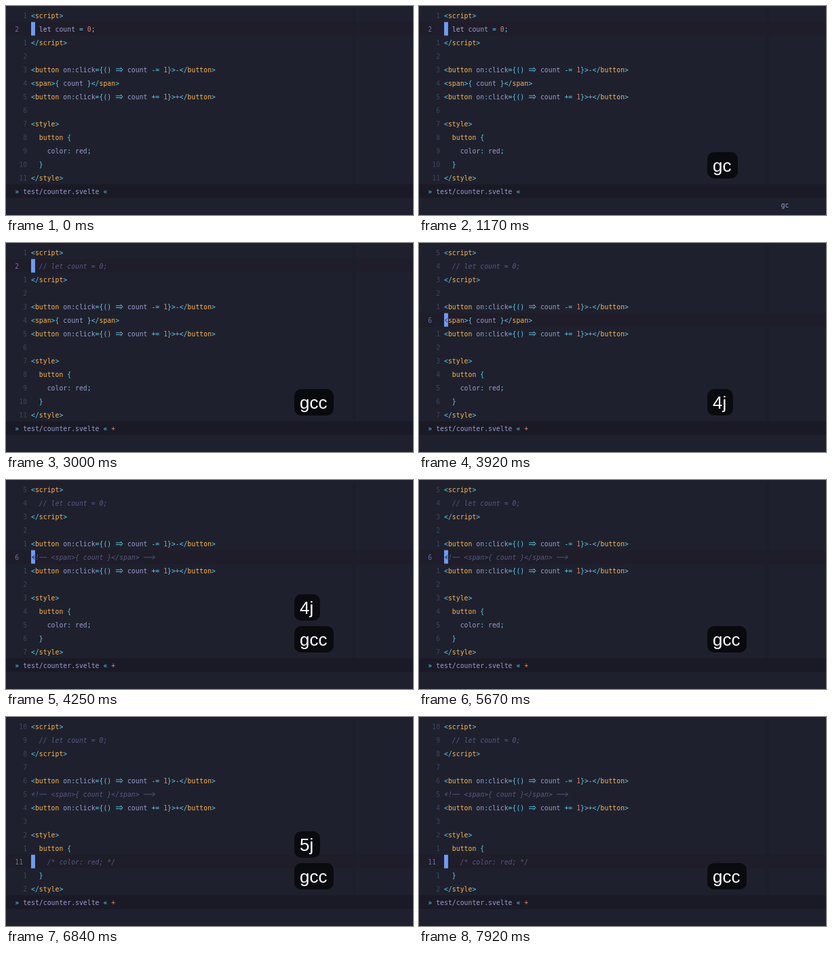
Animation of 600 by 309 pixels, one loop 8 s. Source, as an HTML page with a canvas:

```html
<!DOCTYPE html>
<html lang="en">
<head>
<meta charset="utf-8">
<style>
  html, body { margin: 0; width: 100%; height: 100%; overflow: hidden; background: #1e212d; }
  canvas { display: block; }
</style>
</head>
<body>
<canvas width="600" height="309"></canvas>
<script>
const ctx = document.querySelector('canvas').getContext('2d');
const LOOP = 8000, CELL = 5.913, ROW = 20, LEFT = 37, TOP = 3.7;
const HOLD = 1500, FADE = 170;
const MONO = '9.7px "DejaVu Sans Mono", monospace';
const COLOR = {
  back: '#1e212d', band: '#1e1d29', column: '#1c1e2a', status: '#191a26',
  text: '#9c9cce', keyword: '#b7a5de', tag: '#ffb74d', mark: '#5ccbea',
  number: '#e5806a', comment: '#565a83', gutter: '#3e4360', current: '#6a70a4',
  cursor: '#6c9cf8', plus: '#f08c4a'
};

const code = [
  '<script>', '  let count = 0;', '<\/script>', '',
  '<button on:click={() => count -= 1}>-</button>',
  '<span>{ count }</span>',
  '<button on:click={() => count += 1}>+</button>', '',
  '<style>', '  button {', '    color: red;', '  }', '</style>'
];
const comments = [
  { row: 1, at: 1500, text: '  // let count = 0;' },
  { row: 5, at: 4170, text: '<!-- <span>{ count }</span> -->' },
  { row: 10, at: 6750, text: '    /* color: red; */' }
];
const cursorRows = [[0, 1], [3340, 5], [5840, 10]];
const labels = [
  { from: 1170, done: 1500, keys: 'gcc' },
  { from: 3340, done: 3340, keys: '4j' },
  { from: 4000, done: 4170, keys: 'gcc' },
  { from: 5840, done: 5840, keys: '5j' },
  { from: 6590, done: 6750, keys: 'gcc' }
];
const labelWidth = { gc: 45, gcc: 58, '4j': 38, '5j': 38 };
const pending = [[1170, 1500, 'gc'], [4000, 4170, 'gc'], [5750, 5840, '5'], [6590, 6750, 'gc']];
const tokens = /=>|(?<=>)[+-](?=<)|\d+|\w+|[^\s\w]|\s+/g;

function rect(color, x, y, w, h) {
  ctx.fillStyle = color;
  ctx.fillRect(x, y, w, h);
}

function write(text, col, row, color, style = '') {
  ctx.font = style + MONO;
  ctx.fillStyle = color;
  [...text].forEach((ch, i) => ctx.fillText(ch, LEFT + (col + i) * CELL, TOP + row * ROW + 14));
}

function lines(color, ...paths) {
  ctx.strokeStyle = color;
  ctx.lineWidth = 0.9;
  ctx.beginPath();
  for (const path of paths)
    path.forEach(([x, y], i) => i ? ctx.lineTo(x, y) : ctx.moveTo(x, y));
  ctx.stroke();
}

function doubleArrow(col, row) {
  const x = LEFT + col * CELL + 0.8, y = TOP + row * ROW + 10.5;
  lines(COLOR.mark, [[x, y - 1.4], [x + 8.8, y - 1.4]], [[x, y + 1.4], [x + 8.8, y + 1.4]],
    [[x + 6.8, y - 3.4], [x + 10.2, y], [x + 6.8, y + 3.4]]);
}

function tokenColor(token, index, line) {
  if (token === 'let') return COLOR.keyword;
  if (/^\d/.test(token)) return COLOR.number;
  if (/^(script|button|span|style)$/.test(token)) return COLOR.tag;
  const literal = /[+-]/.test(token) && line[index - 1] === '>';
  return /\w/.test(token) || literal ? COLOR.text : COLOR.mark;
}

function codeLine(line, row) {
  for (const { 0: token, index } of line.matchAll(tokens)) {
    if (token === '=>') doubleArrow(index, row);
    else write(token, index, row, tokenColor(token, index, line));
  }
}

// Markup comment delimiters are drawn as joined arrows.
function commentLine(text, row) {
  const y = TOP + row * ROW + 10.5;
  if (text.startsWith('<!--')) {
    const end = LEFT + text.length * CELL - 0.8;
    lines(COLOR.comment, [[42, y - 3], [38.4, y], [41.2, y + 3]], [[38.4, y], [42.4, y]],
      [[49.5, y], [60, y]], [[end - 16.5, y], [end, y]],
      [[end - 3, y - 3], [end, y], [end - 3.8, y + 3]]);
    text = text.replace('<!--', ' !  ').replace('-->', '');
  }
  write(text, 0, row, COLOR.comment, 'italic ');
}

function drawCursor(row, commented) {
  const y = TOP + row * ROW, mid = y + 10.5;
  rect(COLOR.cursor, LEFT, y, CELL, ROW);
  if (code[row][0] !== '<') return;
  lines(COLOR.back, [[42, mid - 3], [38.6, mid], [42, mid + 3]]);
  if (commented) lines(COLOR.back, [[38.6, mid], [42.4, mid]]);
}

function drawLabels(t) {
  const shown = labels.filter(l => t >= l.from && t < l.done + HOLD + FADE);
  shown.forEach((label, i) => {
    const text = t < label.done ? label.keys.slice(0, -1) : label.keys;
    const y = 216 - 47 * (shown.length - 1 - i);
    ctx.globalAlpha = Math.min(1, 1 - (t - label.done - HOLD) / FADE);
    ctx.fillStyle = '#0a0b0f';
    ctx.beginPath();
    ctx.roundRect(425, y, labelWidth[text], 39, 10);
    ctx.fill();
    ctx.font = '26px "Liberation Sans", Arial, sans-serif';
    ctx.fillStyle = '#fff';
    ctx.fillText(text, 433, y + 29);
    ctx.globalAlpha = 1;
  });
}

function draw(t) {
  const current = cursorRows.findLast(([at]) => t >= at)[1];
  rect(COLOR.back, 0, 0, 600, 309);
  rect(COLOR.band, 0, TOP + current * ROW, 600, ROW);
  rect(COLOR.column, 511, 4, 5, 260);
  rect(COLOR.status, 0, TOP + 13 * ROW, 600, ROW);

  code.forEach((line, row) => {
    const note = comments.find(c => c.row === row && t >= c.at);
    if (note) commentLine(note.text, row);
    else codeLine(line, row);
    if (row === current) drawCursor(row, note);
    const number = String(row === current ? row + 1 : Math.abs(row - current));
    if (row === current) write(number, -4, row, COLOR.current);
    else write(number, -1 - number.length, row, COLOR.gutter);
  });

  write('»', -4, 13, COLOR.mark);
  write('test/counter.svelte', -2, 13, COLOR.text);
  write('«', 18, 13, COLOR.mark);
  if (t >= 1500) write('+', 20, 13, COLOR.plus);
  for (const [from, to, keys] of pending)
    if (t >= from && t < to) write(keys, 84, 14, COLOR.text);
  drawLabels(t);
}

function frame() {
  draw(performance.now() % LOOP);
  requestAnimationFrame(frame);
}
frame();
</script>
</body>
</html>
```
